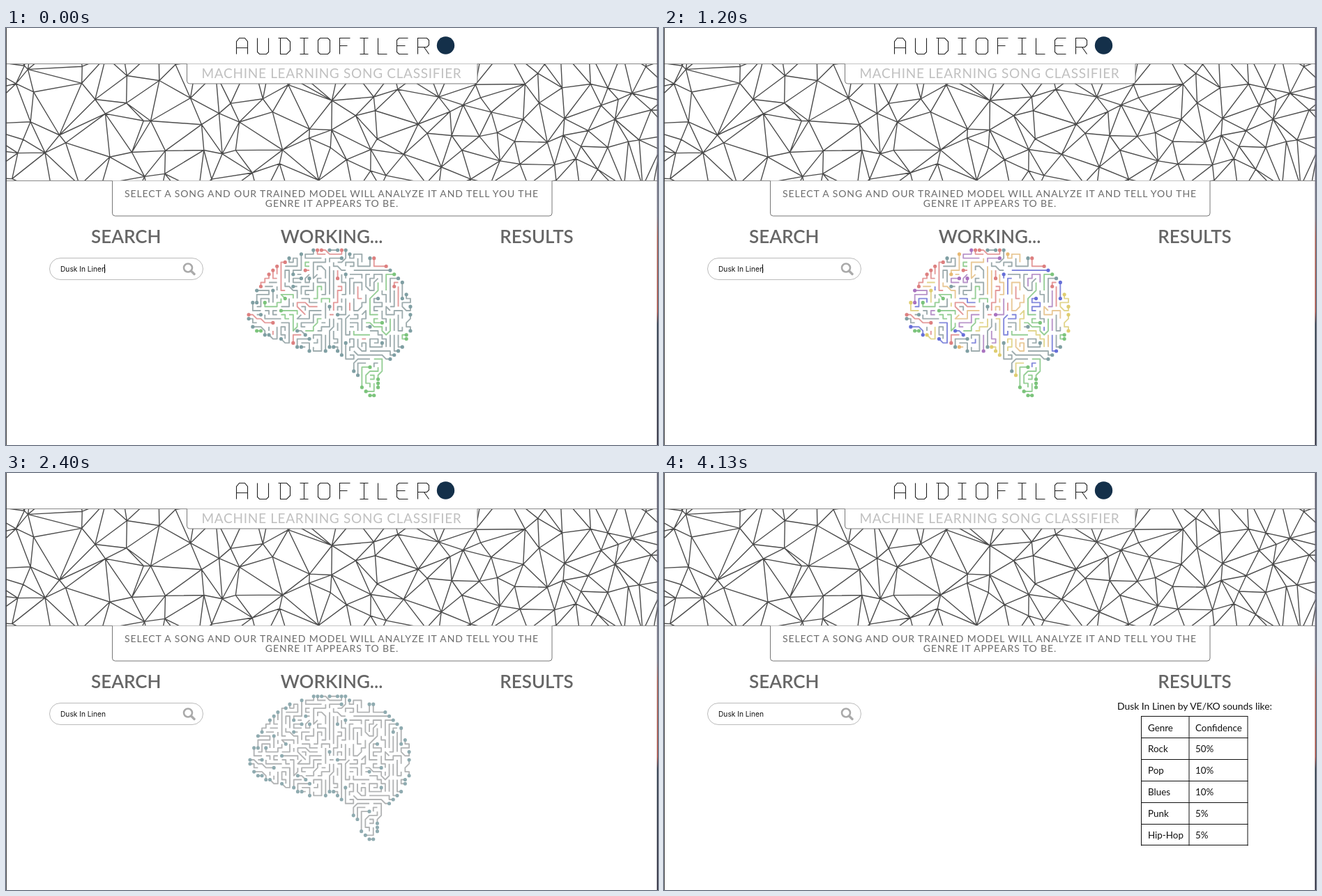
Animation, 935 px wide and 599 px high, one loop 4190 ms. Source, as an HTML page:

```html
<!DOCTYPE html>
<html lang="en">
<head>
<meta charset="utf-8">
<title>Audiofiler</title>
<style>
  html, body { margin: 0; width: 100%; height: 100%; overflow: hidden; background: #fff; }
  svg { display: block; width: 935px; height: 599px; font-family: Lato, sans-serif; }
  path, .line { fill: none; }
  .box { fill: #fff; stroke: #777; }
  .mid { text-anchor: middle; }
  .sub { font-size: 19px; letter-spacing: .7px; fill: #c0c0c0; }
  .intro { font-size: 14px; letter-spacing: .9px; fill: #6c6c6c; }
  .head { font-size: 26px; font-weight: 600; fill: #666; }
  .field { font: 10.2px Inter, sans-serif; fill: #111; }
  .result { font-size: 13.9px; fill: #111; }
  .cell { font-size: 13.4px; fill: #111; }
  .trace { stroke-width: 1.9; stroke-linejoin: round; }
  .dots { stroke-width: 5.2; stroke-linecap: round; }
</style>
</head>
<body>
<svg viewBox="0 0 935 599">
  <defs>
    <clipPath id="band"><rect y="52" width="934" height="167"/></clipPath>
    <linearGradient id="edge" x2="0" y2="1">
      <stop offset="0" stop-color="#556"/>
      <stop offset=".45" stop-color="#778"/>
      <stop offset=".5" stop-color="#a65a50"/>
      <stop offset=".68" stop-color="#a4483f"/>
      <stop offset=".71" stop-color="#223040"/>
      <stop offset="1" stop-color="#223"/>
    </linearGradient>
  </defs>

  <g id="title" stroke="#222" stroke-width="1.1" role="img" aria-label="AUDIOFILER"></g>
  <circle cx="630.5" cy="25" r="12.7" fill="#14304a"/>

  <g clip-path="url(#band)"><path id="mesh" stroke="#4c4c4c" stroke-width="1.4"/></g>
  <path d="M0 51.5H934M0 219.5H934" stroke="#888"/>
  <path class="box" d="M259.5 51.5V76q0 4 4 4H672q4 0 4-4V51.5"/>
  <text class="sub mid" x="467" y="72">MACHINE LEARNING SONG CLASSIFIER</text>
  <path class="box" d="M152.5 219.5V266q0 4 4 4H779q4 0 4-4V219.5"/>
  <text class="intro mid" x="467" y="243">SELECT A SONG AND OUR TRAINED MODEL WILL ANALYZE IT AND TELL YOU THE</text>
  <text class="intro mid" x="467.5" y="256.5">GENRE IT APPEARS TO BE.</text>

  <text class="head mid" x="172.3" y="308.5">SEARCH</text>
  <text class="head mid" x="761" y="308.5">RESULTS</text>
  <rect class="line" x="62.5" y="330.5" width="220" height="31" rx="15.5" stroke="#bbb"/>
  <text class="field" x="78" y="349.5">Dusk In Linen</text>
  <path id="caret" d="M141.5 339.5V352" stroke="#000"/>
  <g class="line" stroke="#aaa" stroke-width="2.6">
    <circle cx="261" cy="344.5" r="6"/>
    <path d="M265.5 349L270 353.5" stroke-width="3.4" stroke-linecap="round"/>
  </g>

  <g id="working">
    <text class="head mid" x="467" y="308.5">WORKING...</text>
    <g id="brain"></g>
  </g>

  <g id="results">
    <text class="result mid" x="761" y="339.5">Dusk In Linen by VE/KO sounds like:</text>
    <g id="table"></g>
  </g>

  <path d="M.5 0V599" stroke="#444"/>
  <rect x="933.5" width="1.5" height="599" fill="url(#edge)"/>
</svg>
<script>
const LOOP = 4190, STEP = LOOP / 63;
const $ = id => document.getElementById(id);
const add = (parent, tag, attrs, text = '') => {
  const el = document.createElementNS('http://www.w3.org/2000/svg', tag);
  for (const k in attrs) el.setAttribute(k, attrs[k]);
  el.textContent = text;
  return parent.appendChild(el);
};

let seed = 29;
const rand = () => {
  seed = (seed + 0x6D2B79F5) | 0;
  let r = Math.imul(seed ^ (seed >>> 15), 1 | seed);
  r = (r + Math.imul(r ^ (r >>> 7), 61 | r)) ^ r;
  return ((r ^ (r >>> 14)) >>> 0) / 4294967296;
};

// Title: thin cut-corner letters, each with its width
const glyphs = {
  A: [16, 'M0 23V5L4 0H12L16 5V23M0 14H16'],
  U: [16, 'M0 0V20L3 23H13L16 20V0'],
  D: [17, 'M0 0H12L17 5V18L12 23H3V0'],
  I: [12, 'M0 0H12M6 0V23M0 23H12'],
  O: [17, 'M3 0H14L17 3V20L14 23H3L0 20V3Z'],
  F: [15, 'M15 0H0V23M0 11H11'],
  L: [13, 'M0 0V23H13'],
  E: [16, 'M16 0H3L0 3V20L3 23H16M0 11H12'],
  R: [16, 'M0 23V0H13L16 3V10L13 13H0M9 13L16 23']
};
let pen = 330.5;
for (const ch of 'AUDIOFILER') {
  const [width, d] = glyphs[ch];
  add($('title'), 'path', { d, transform: `translate(${pen} 14.5)` });
  pen += width + 14;
}

// Banner: Delaunay mesh over a jittered grid that tightens to the right
const knots = [];
for (let x = -40, gap; x < 980; x += gap) {
  gap = 45 - x / 80;
  for (let y = 10; y < 270; y += gap) knots.push([x + (rand() - .5) * gap, y + (rand() - .5) * gap]);
}
function meshPath(p) {
  const edges = new Set(), n = p.length;
  const near = (a, b) => Math.hypot(a[0] - b[0], a[1] - b[1]) < 140;
  for (let i = 0; i < n; i++) for (let j = i + 1; j < n; j++) {
    if (!near(p[i], p[j])) continue;
    for (let k = j + 1; k < n; k++) {
      if (!near(p[i], p[k])) continue;
      const [ax, ay] = p[i], bx = p[j][0] - ax, by = p[j][1] - ay, cx = p[k][0] - ax, cy = p[k][1] - ay;
      const d = 2 * (bx * cy - by * cx), b2 = bx * bx + by * by, c2 = cx * cx + cy * cy;
      const ux = (cy * b2 - by * c2) / d, uy = (bx * c2 - cx * b2) / d, r2 = ux * ux + uy * uy;
      const empty = r2 < 8000 && p.every(([x, y], m) => m === i || m === j || m === k ||
        (x - ax - ux) ** 2 + (y - ay - uy) ** 2 >= r2);
      if (empty) [[i, j], [j, k], [i, k]].forEach(([a, b]) => edges.add(`M${p[a]}L${p[b]}`));
    }
  }
  return [...edges].join('');
}
$('mesh').setAttribute('d', meshPath(knots));

// Brain: circuit traces grown on a grid inside an outline
const outline = new Path2D('M347 412C350 360 400 317 460 316C530 316 582 355 584 408C584 440 570 465 542 484' +
  'C540 505 534 520 529 533C512 522 500 505 492 482L474 464C462 455 458 470 446 470C420 466 400 448 378 446' +
  'C355 438 347 428 347 412Z');
const probe = document.createElement('canvas').getContext('2d');
const GRID = 5.8;
const at = (c, r) => [+(348 + c * GRID).toFixed(1), +(319 + r * GRID).toFixed(1)];
const inside = (c, r) => probe.isPointInPath(outline, ...at(c, r));
const dirs = [[1, 0], [1, 1], [0, 1], [-1, 1], [-1, 0], [-1, -1], [0, -1], [1, -1]];
const used = new Set();
const free = (c, r) => inside(c, r) && !used.has(c + ',' + r);
const rim = (c, r) => dirs.some(([x, y], i) => i % 2 === 0 && !inside(c + x, r + y));

const plain = ['#b2b4b5', '#8fabb0'];
const tint = {
  base: ['#9fadaf', '#7f9fa3'], green: ['#97cf97', '#7cc47c'], red: ['#e49a9a', '#dd8080'],
  blue: ['#8389dc', '#666fd8'], purple: ['#b995ca', '#a872bf'],
  yellow: ['#e2d68f', '#dfcd70'], orange: ['#e9c998', '#e8b973']
};
const names = Object.keys(tint);
const groups = names.map(() => ({ line: '', dots: '' }));
// A third stays base; the stem is green
const pickGroup = y => y > 490 ? 1 : rand() < .3 ? 0 : 1 + Math.floor(rand() * 6);

function grow(c, r, dir, max) {
  const cells = [[c, r]];
  used.add(c + ',' + r);
  while (cells.length < max) {
    const bend = rand() < .25 ? (rand() < .5 ? 2 : 6) : rand() < .12 ? 1 : 0;
    const next = [bend, 0, 2, 6, 1, 7].map(b => (dir + b) % 8).find(d => {
      const [x, y] = dirs[d];
      const crosses = x && y && !free(c + x, r) && !free(c, r + y);
      return free(c + x, r + y) && !crosses;
    });
    if (next === undefined) break;
    c += dirs[next][0];
    r += dirs[next][1];
    // Diagonals last one cell
    dir = next % 2 ? (next + (rand() < .5 ? 1 : 7)) % 8 : next;
    used.add(c + ',' + r);
    cells.push([c, r]);
  }
  if (cells.length < 2) return;
  const spots = cells.map(q => at(...q));
  const g = groups[pickGroup(spots[spots.length >> 1][1])];
  g.line += 'M' + spots.join('L');
  for (const q of [cells[0], cells[cells.length - 1]]) {
    if (rim(...q) || rand() < .13) g.dots += `M${at(...q)}h.01`;
  }
}
const cells = [];
for (let r = 0; r < 38; r++) for (let c = 0; c < 42; c++) if (inside(c, r)) cells.push([c, r, rand()]);
cells.sort((a, b) => a[2] - b[2]);
const inward = (c, r) => {
  const [x, y] = at(c, r), dx = 465 - x, dy = 400 - y;
  return Math.abs(dx) > Math.abs(dy) * 1.15 ? (dx > 0 ? 0 : 4) : (dy > 0 ? 2 : 6);
};
for (const [c, r] of cells) {
  if (rim(c, r) && (c + r) % 2 === 0 && free(c, r)) grow(c, r, inward(c, r), 4 + rand() * 6);
}
for (const [c, r] of cells) if (free(c, r)) grow(c, r, 2 * Math.floor(rand() * 4), 4 + rand() * 7);

const layers = groups.map(g => [
  add($('brain'), 'path', { class: 'trace', d: g.line }),
  add($('brain'), 'path', { class: 'dots', d: g.dots })
]);

// Highlights light up one after another, hold, then all go out
const litAt = t => Math.min(6, Math.floor((t + 155) % 840 / 65));
function paint(lit) {
  layers.forEach((pair, i) => {
    const colours = !lit ? plain : i > lit ? tint.base : tint[names[i]];
    pair.forEach((el, k) => el.setAttribute('stroke', colours[k]));
  });
}

// Result table
const rows = [['Genre', 'Confidence'], ['Rock', '50%'], ['Pop', '10%'], ['Blues', '10%'], ['Punk', '5%'], ['Hip-Hop', '5%']];
let rules = 'M684.5 350V535.5M753 350V535.5M837 350V535.5';
for (let i = 0; i <= rows.length; i++) rules += `M684 ${Math.round(350 + i * 30.9) - .5}H837.5`;
add($('table'), 'path', { d: rules, stroke: '#111' });
rows.forEach((row, i) => row.forEach((s, j) =>
  add($('table'), 'text', { class: 'cell', x: 694 + j * 68, y: 370.5 + i * 30.9 }, s)));

const FADE = 2870, FADE_TIME = 400;
function draw(t) {
  const scale = (233 + 3.5 * Math.cos((t - 100) / 500 * Math.PI)) / 236;
  $('brain').setAttribute('transform', `translate(465.5 424) scale(${scale.toFixed(4)}) translate(-465.5 -424)`);
  paint(litAt(t));
  const p = Math.min(1, Math.max(0, (t - FADE) / FADE_TIME));
  $('working').setAttribute('opacity', (.5 + Math.cos(p * Math.PI) / 2).toFixed(3));
  $('results').setAttribute('opacity', t >= FADE ? 1 : 0);
  $('caret').setAttribute('opacity', t < 2500 && (t + 120) % 1000 < 500 ? 1 : 0);
}
function tick() {
  const t = performance.now() % LOOP;
  draw(Math.floor((t + 4) / STEP) * STEP % LOOP);
  requestAnimationFrame(tick);
}
tick();
</script>
</body>
</html>
```
